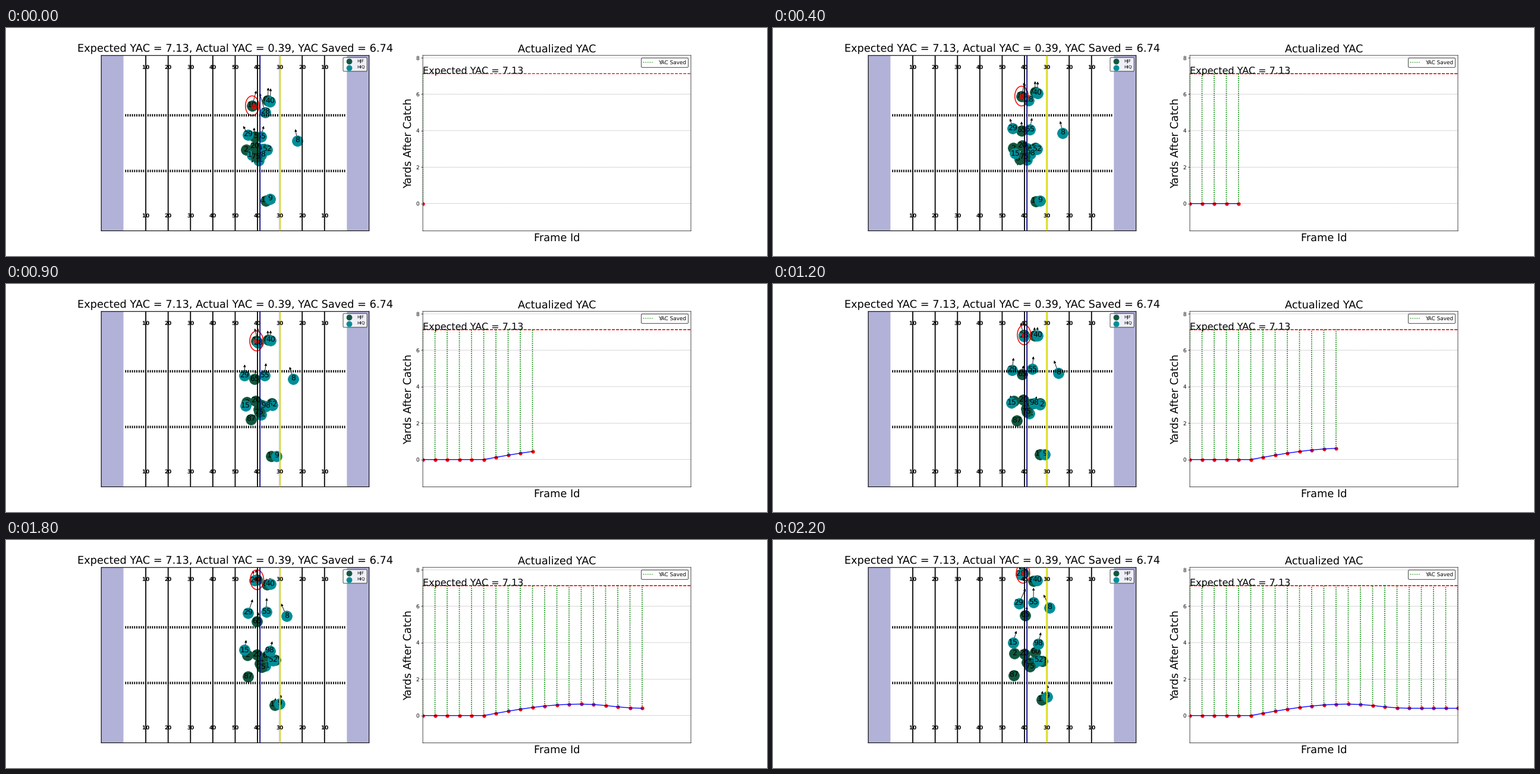
Recreate the animation shown at these times as a matplotlib script. Size 1280 by 384 pixels, loop 2.3 s.

```python
import numpy as np
import matplotlib.pyplot as plt
from matplotlib.animation import FuncAnimation
from matplotlib.patches import Circle, FancyArrowPatch, Rectangle

N_FRAMES = 23
LAST = N_FRAMES - 1
EXPECTED = 7.13
GREEN, TEAL = "#125740", "#008E97"
LOOKAHEAD = 6  # frames of travel shown by each arrow

plt.rcParams.update({"path.snap": False, "text.hinting": "none"})
fig, (field, chart) = plt.subplots(1, 2, figsize=(20, 6), dpi=64)


def yards(px, py):
    """Stage pixels to field coordinates."""
    return (px - 160) * 120 / 451.76, (341.76 - py) * 53.3 / 295.68


class Player:
    """Numbered disc that glides through evenly timed key points."""

    def __init__(self, order, number, color, *points):
        times = np.linspace(0, LAST, len(points))
        coords = zip(*(yards(*p) for p in points))
        self.curves = [np.poly1d(np.polyfit(times, c, len(points) - 1)) for c in coords]
        z = 1.1 + order * 0.02
        self.disc = field.scatter([], [], s=400, color=color, zorder=z)
        self.label = field.text(0, 0, number, fontsize=14, ha="center", va="center",
                                zorder=z + 0.01, clip_on=True)
        self.arrow = field.add_patch(FancyArrowPatch(
            (0, 0), (1, 1), arrowstyle="-|>,head_length=0.4,head_width=0.2",
            mutation_scale=9, shrinkA=0, shrinkB=0, color="black", lw=1, zorder=1.05))

    def at(self, t):
        return np.array([c(t) for c in self.curves])

    def move(self, t):
        here = self.at(t)
        ahead = here + LOOKAHEAD * np.array([c.deriv()(t) for c in self.curves])
        self.disc.set_offsets([here])
        self.label.set_position(here)
        self.arrow.set_positions(here, ahead)


# Listed from bottom to top, with key points in stage pixels.
SQUAD = [
    ("62", GREEN, (435, 204), (449, 201), (454, 204)),
    ("94", TEAL, (431, 204), (428, 203), (437, 206)),
    ("91", TEAL, (426, 223), (431, 219), (440, 207)),
    ("55", TEAL, (429.5, 183), (436, 147), (438.5, 105)),
    ("87", GREEN, (419, 212), (411, 229.5), (405.5, 227.5)),
    ("2", GREEN, (404, 205), (406.5, 191)),
    ("16", GREEN, (437.5, 291), (448.5, 288), (453, 269)),
    ("84", GREEN, (441, 122), (441, 89), (439, 69)),
    ("10", GREEN, (414.5, 131), (422.5, 89), (421, 56)),
    ("77", GREEN, (424, 215), (428, 206)),
    ("60", GREEN, (425, 208), (434, 203), (442, 189)),
    ("65", GREEN, (418, 183), (419.5, 155), (424.5, 127)),
    ("29", TEAL, (407, 180), (402, 148), (414, 107)),
    ("52", TEAL, (440, 204.5), (449, 203.5), (447.5, 202.5)),
    ("98", TEAL, (430, 214), (439, 202.5), (447, 175)),
    ("15", TEAL, (414, 214), (402, 201.5), (404.5, 173)),
    ("75", GREEN, (421.5, 217), (433, 213)),
    ("20", GREEN, (419, 200), (423, 191.5)),
    ("40", TEAL, (445, 124), (445.5, 89.5), (444.5, 68)),
    ("28", TEAL, (436.5, 142), (423, 91.5), (417, 58)),
    ("8", TEAL, (490.5, 189.5), (481.5, 153), (466, 114)),
    ("9", TEAL, (444.5, 288), (457, 288), (462, 264)),
]

# Field
field.set(xlim=(0, 120), ylim=(0, 53.3), xticks=[], yticks=[])
field.set_title("Expected YAC = 7.13, Actual YAC = 0.39, YAC Saved = 6.74", fontsize=20)
field.add_patch(Rectangle((0, 0), 120, 53.3, fill=False, edgecolor="black", lw=1.5))
for x in (0, 110):
    field.add_patch(Rectangle((x, 0), 10, 53.3, facecolor="navy", alpha=0.3, lw=0.1, zorder=0))
for x in range(20, 101, 10):
    field.axvline(x, color="black", lw=2)
    for y in (4.1, 49.2):
        field.text(x, y, str(min(x, 120 - x) - 10), ha="center", fontsize=10, weight="bold")
for y in (18.2, 35.1):
    field.vlines(range(11, 110), y - 0.38, y + 0.38, color="black", lw=2)
field.axvline(71.1, color="navy", lw=2)
field.axvline(80, color="yellow", lw=2)

players = [Player(i, *spec) for i, spec in enumerate(SQUAD)]
target = next(p for p in players if p.label.get_text() == "10")
ring = field.add_patch(Circle((0, 0), 3, fill=False, edgecolor="red", lw=1.7, zorder=1.8))
ball = field.scatter([], [], s=80, color="red", alpha=0.7, lw=1, zorder=1.9)

teams = [field.scatter([], [], s=400, color=c, label=name) for name, c in (("HJF", GREEN), ("HIQ", TEAL))]
field.legend(handles=teams, loc="upper right", fontsize="small", markerscale=0.5,
             edgecolor="black").set_zorder(5)

# Chart
chart.set(xlim=(0, LAST), ylim=(-1.5, EXPECTED + 1), xticks=[], yticks=range(0, 9, 2))
chart.set_title("Actualized YAC", fontsize=20)
chart.set_xlabel("Frame Id", fontsize=20)
chart.set_ylabel("Yards After Catch", fontsize=20)
chart.grid(axis="y", color="gray", ls="--", lw=0.5)
chart.set_axisbelow(True)
chart.text(0, EXPECTED, "Expected YAC = 7.13", fontsize=18)
saved_key, = chart.plot([], [], color="green", ls=":", lw=1.5, label="YAC Saved")
chart.legend(handles=[saved_key], loc="upper right", edgecolor="black")

# Yards gained: none until the catch, up to a peak, then pushed back.
steps = np.arange(N_FRAMES)
rise = 0.63 * np.sin(np.pi / 2 * np.clip((steps - 5) / 8, 0, 1))
loss = 0.23 * (1 - np.cos(np.pi * np.clip((steps - 13) / 5, 0, 1))) / 2
gained = rise - loss

limits = [chart.axhline(EXPECTED, color="red", ls="--", lw=1.5) for _ in range(2)]
saved = [chart.plot([i, i], [v, EXPECTED], color="green", ls=(0, (0.9, 1.1)), lw=2)[0]
         for i, v in enumerate(gained)]
curve, = chart.plot([], [], color="blue", lw=1.5)
dots = chart.scatter([], [], color="red")


def update(t):
    for p in players:
        p.move(t)
    catcher = target.at(t)
    ring.set_center(catcher)
    ball.set_offsets([catcher + np.array([0.8, -0.2]) * max(0, 1 - t / 4)])
    for group in (limits, saved):
        for i, line in enumerate(group):
            line.set_visible(i <= t)
    curve.set_data(steps[:t + 1], gained[:t + 1])
    dots.set_offsets(np.column_stack([steps, gained])[:t + 1])
    return []


anim = FuncAnimation(fig, update, frames=N_FRAMES, interval=100, init_func=lambda: update(0),
                     repeat=True, repeat_delay=0)
plt.show()
```
